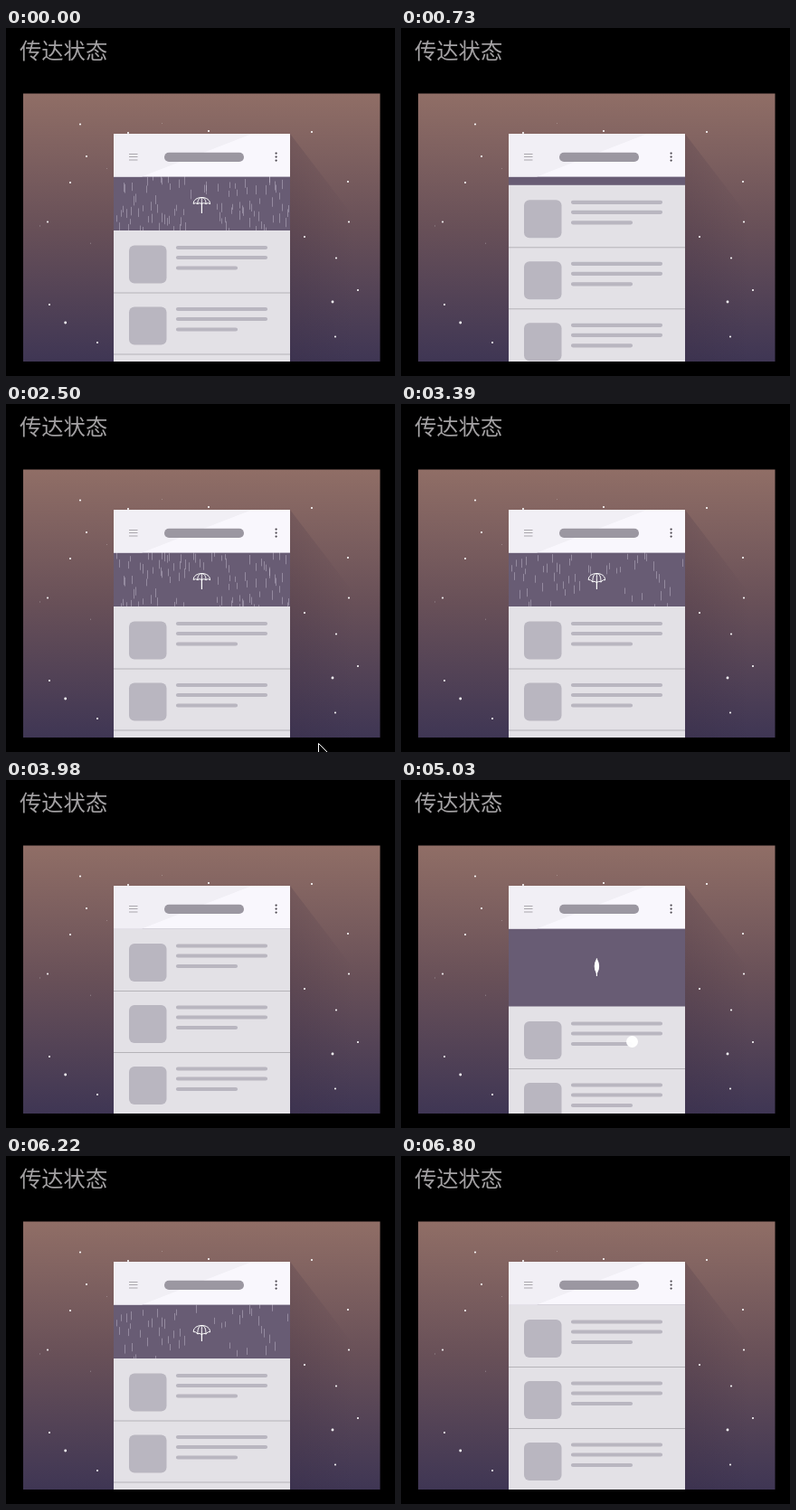
An HTML page for the animation above (7.19 s loop, 430x385 px).

```html
<!DOCTYPE html>
<html lang="zh">
<head>
<meta charset="utf-8">
<title>传达状态</title>
<style>
  html, body { margin: 0; width: 100%; height: 100%; overflow: hidden; background: #000; }
  svg { display: block; width: 430px; height: 385px; }
  text { font: 300 24.3px "Noto Sans CJK SC", "Noto Sans CJK", sans-serif; fill: #a3a1a3; }
</style>
</head>
<body>
<svg viewBox="0 0 430 385">
  <defs>
    <linearGradient id="sky" x1="0" y1="0" x2="0" y2="1">
      <stop offset="0" stop-color="#906e66"/>
      <stop offset=".5" stop-color="#685058"/>
      <stop offset="1" stop-color="#3f3654"/>
    </linearGradient>
    <linearGradient id="shade" gradientUnits="userSpaceOnUse" x1="314" y1="0" x2="385" y2="0">
      <stop offset="0" stop-color="#30233a" stop-opacity=".17"/>
      <stop offset="1" stop-color="#30233a" stop-opacity="0"/>
    </linearGradient>
    <clipPath id="phone"><rect x="119" y="117" width="195" height="252"/></clipPath>
    <g id="row">
      <rect x="136" y="181" width="41.5" height="42" rx="6" fill="#b9b6c0"/>
      <path d="M190 183.5H287M190 194.5H287M190 206H254" stroke="#b9b6c0" stroke-width="4.2" stroke-linecap="round"/>
      <path d="M119 233.5H314" stroke="#b5b3b8"/>
    </g>
  </defs>

  <text x="15" y="34">传达状态</text>
  <rect x="19" y="72.5" width="394.5" height="296.5" fill="url(#sky)"/>
  <path d="M314 117L413.5 247V369H314Z" fill="url(#shade)"/>
  <g id="stars" fill="#fff"></g>

  <g clip-path="url(#phone)">
    <rect x="119" y="160" width="195" height="209" fill="#685c74"/>
    <path id="rain" fill="none" stroke="#d6d0e0" stroke-opacity=".4"/>
    <g id="umbrella" stroke="#fff" stroke-linecap="round" stroke-linejoin="round">
      <path id="canopy"/>
      <path id="handle" stroke-width="1.2"/>
    </g>
    <g id="list">
      <rect x="119" y="164.5" width="195" height="300" fill="#e3e1e6"/>
      <use href="#row"/>
      <use href="#row" y="68"/>
      <use href="#row" y="136"/>
    </g>
    <rect x="119" y="117" width="195" height="47.6" fill="#f9f7fd"/>
    <path d="M119 117H272L150 164.6H119Z" fill="#f1eff5"/>
    <path d="M136 139.5H145.5M136 142.5H145.5M136 146H145.5" stroke="#aaa7ad"/>
    <rect x="175" y="137.7" width="88" height="10.3" rx="5.1" fill="#9b97a1"/>
    <path d="M298.6 138.6v0m0 4v0m0 4v0" stroke="#4a464e" stroke-width="2.3" stroke-linecap="round"/>
  </g>

  <circle id="finger" cx="255.5" r="6.5" fill="#fff" fill-opacity=".96"/>
  <path id="cursor" d="M0 0V17L4 13.2L7 20L10 18.7L7 12H12Z" fill="#000" stroke="#fff"/>
</svg>

<script>
const LOOP = 7190, STEP = 148, LEAD = 17, LAST = 46;
const OPEN = 59.5, STRETCH = 26.5;

// Each visit in steps: pull begins, length of the pull, list closed again
const visits = [
  { start: -15, hold: 5, end: 6 },
  { start: 7, hold: 5, end: 27 },
  { start: 28, hold: 6, end: LAST }
];

const el = id => document.getElementById(id);
const set = (id, attrs) => {
  for (const name in attrs) el(id).setAttribute(name, attrs[name]);
};
const show = (id, on) => set(id, { visibility: on ? 'visible' : 'hidden' });
const clamp = x => Math.max(0, Math.min(1, x));
const smooth = x => x * x * (3 - 2 * x);

function random(seed) {
  return () => (seed = (seed * 16807) % 2147483647) / 2147483647;
}
const rand = random(4217);

// Bright stars first, then seeded faint ones
const stars = [
  [65.7, 326], [361, 303], [224, 114], [364, 341.5], [82, 106.5], [338, 115],
  [71, 171], [46, 214.5], [101, 348], [378, 170], [379, 214.5], [389, 290],
  [135, 116], [89, 142], [48, 306], [330, 231], [365, 254.5]
];
const star = (x, y, r) => `<circle cx="${x}" cy="${y}" r="${r}"/>`;
el('stars').innerHTML =
  stars.map(([x, y], i) => star(x, y, i < 2 ? 1.4 : 1.05)).join('') +
  Array.from({ length: 7 }, () => star(25 + rand() * 380, 80 + rand() * 200, .35)).join('');

const drops = Array.from({ length: 105 }, (_, i) => ({
  x: Math.round(121 + i * 1.82 + rand() * 3) + .5,
  y: rand() * 62, len: 6 + rand() * 5, rank: rand()
}));

function drawRain(k, amount) {
  let d = '';
  for (const p of drops) {
    const y = (p.y + k * 23) % 62 - 3;
    const sheltered = Math.abs(p.x - 216) < 17 && y > 16;
    if (p.rank < amount && !sheltered) d += `M${p.x} ${164 + y}v${p.len}`;
  }
  set('rain', { d });
}

function drawFolded(drop) {
  const x = 216.4, top = 154 + 44 * drop;
  set('canopy', {
    d: `M${x} ${top}q4.6 8 0 16q-4.6 -8 0 -16Z`,
    fill: '#fff'
  });
  set('handle', { d: `M${x} ${top + 15}V${187 + 29.5 * drop}` });
}

// Four panels: ribs run from the tip, with a scallop between neighbours
function drawOpened(open, tilt) {
  const x = 216.4, w = 9.2 * open, top = 193 - 5.5 * open, h = 15 - 8 * open;
  const rib = t => [x + w * t, top + h + tilt * (1 - t * t)];
  let d = '';
  for (let t = -1; t <= 1; t += .5) {
    const [rx, ry] = rib(t);
    d += `M${x} ${top}C${x + w * t * .6} ${top} ${rx} ${top + h * .4} ${rx} ${ry}`;
    if (t < 1) {
      const [nx, ny] = rib(t + .5);
      d += `Q${(rx + nx) / 2} ${(ry + ny) / 2 - 1.8} ${nx} ${ny}`;
    }
  }
  set('canopy', { d, fill: 'none' });
  set('handle', { d: `M${x} ${top + h + tilt - .5}V204.5` });
}

function draw(k) {
  const { start, hold, end } = visits.find(v => k <= v.end);
  const since = k - start, left = end - k, after = since - hold;
  const drag = clamp(since / hold);

  const pulled = after < 0
    ? (OPEN + STRETCH) * (1 - (1 - drag) ** 2.07)
    : OPEN + STRETCH * clamp(1 - after / 2);
  set('list', { transform: `translate(0 ${pulled * smooth(clamp(left / 4))})` });

  drawRain(k, clamp((after - 2) / 3) * clamp((left - 2.5) / 2.5));

  show('umbrella', after >= -2);
  if (after <= 0) drawFolded(clamp(1 + after / 2));
  else drawOpened(clamp(after / 3), 3 * clamp(5 - left));

  show('finger', since > 0 && after <= 0);
  set('finger', { cy: 218.2 + 71.3 * drag });

  // The mouse pointer sweeps in from the right and leaves below
  const sweep = (k - 14) / 3;
  show('cursor', sweep >= 0 && sweep <= 1);
  set('cursor', {
    transform: `translate(${345.5 + 71.5 * (1 - sweep) ** 4} ${240 + 135.5 * sweep})`
  });
}

let shown = -1;
function frame(now) {
  const k = Math.min(LAST, Math.floor((now % LOOP + LEAD) / STEP));
  if (k !== shown) draw(shown = k);
  requestAnimationFrame(frame);
}
frame(0);
</script>
</body>
</html>
```
